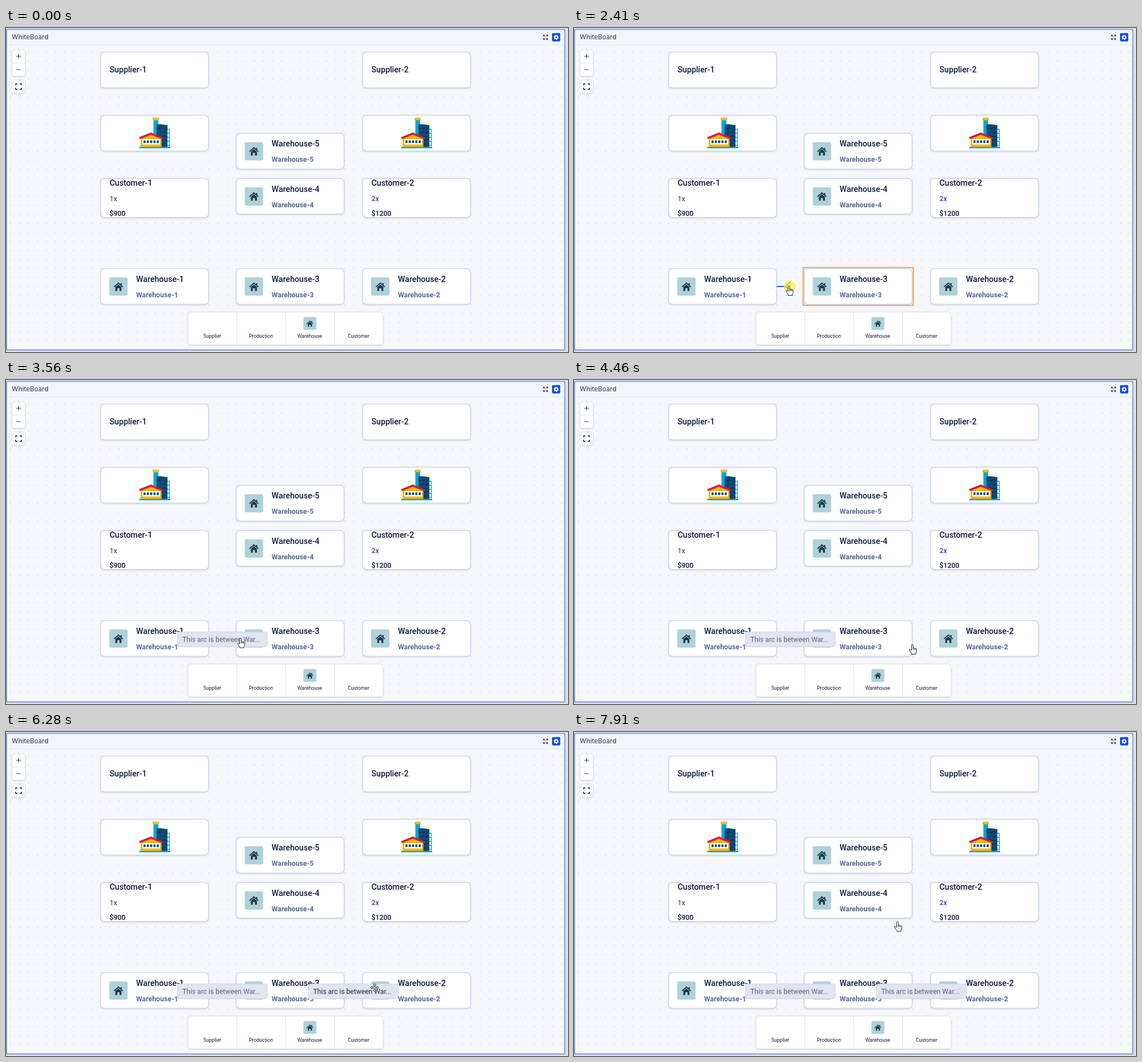
Animation of 985x569 px, one loop 8000 ms. Source, as an HTML page:

```html
<!DOCTYPE html>
<html lang="en">
<head>
<meta charset="utf-8">
<title>WhiteBoard</title>
<style>
html, body { margin: 0; width: 100%; height: 100%; overflow: hidden; background: #dfe0e6; }
svg { display: block; }
text { font-family: Roboto, Arial, sans-serif; font-weight: 500; fill: #0b1a3c; }
.title { font-size: 14.2px; }
.sub { font-size: 12.3px; fill: #566a98; font-weight: 600; }
.money { font-size: 12.3px; }
.tool { font-size: 8.7px; text-anchor: middle; font-weight: 400; }
.head { font: 500 11.5px Inter, Roboto, sans-serif; fill: #4d5366; }
.tip { font-size: 12.1px; font-weight: 400; }
.card { fill: #fff; stroke: #cdd6e9; stroke-width: 1.4; }
.hot { fill: none; stroke: #f6a64c; stroke-width: 2; }
.link { fill: none; stroke: #2f62c4; stroke-width: 1.8; }
</style>
</head>
<body>
<svg width="985" height="569" viewBox="0 0 985 569">
  <defs>
    <pattern id="dots" x="-.3" y="2.4" width="15.84" height="15.84" patternUnits="userSpaceOnUse">
      <circle cx="7.9" cy="7.9" r=".85" fill="#cdd3df"/>
    </pattern>
    <filter id="soft" x="-10%" y="-20%" width="120%" height="150%">
      <feDropShadow dx="0" dy="1" stdDeviation="1" flood-color="#8fa0c4" flood-opacity=".4"/>
    </filter>
    <g id="house">
      <rect x="-16" y="-16" width="32" height="32" rx="2.5" fill="#aed1da"/>
      <path d="M-7.6 .6L0-6.2L7.6 .6" fill="none" stroke="#1d394c" stroke-width="1.9"/>
      <path d="M3.6-6h2.2v4l-2.2-2zM-5.3 1L0-3.7L5.3 1V7.6H1.9V2.8H-1.9V7.6H-5.3z" fill="#1d394c"/>
    </g>
    <g id="factory">
      <path d="M258.5 161h8.5v40h-8.5z" fill="#08a5d3"/>
      <path d="M264 169h7l12 1.5v40h-19z" fill="#0f4a75"/>
      <path d="M264 176h19M264 183h19M264 190h19M270 197h13M272 204h11" stroke="#0a2f50" stroke-width="1.2"/>
      <path d="M283 178h3.6v33M283 185h3.6M283 192h3.6M283 199h3.6M283 206h3.6" fill="none" stroke="#08a5d3" stroke-width="1.3"/>
      <rect x="257" y="157.6" width="11.3" height="4.6" rx="1" fill="#fdb50b"/>
      <path d="M236 193L254 186L272.5 193V209H236z" fill="#fdb50b"/>
      <rect x="239" y="195" width="31" height="9.5" rx="1" fill="#fff"/>
      <path d="M241 199.7h27.5" stroke="#0f4a75" stroke-width="4.6" stroke-dasharray="3.7 2.1"/>
      <path d="M234 193.5L254 185.5L274.3 193.5" fill="none" stroke="#d01c53" stroke-width="3.6"/>
      <path d="M233.5 210h54.5" stroke="#08a5d3" stroke-width="2.6"/>
    </g>
  </defs>
  <rect x="1" y="2.7" width="978.3" height="562.8" rx="1" fill="#f6f7fb" stroke="#5b83d6" stroke-width="1.5"/>
  <path d="M2 3.5h976.5v26.5h-976.5z" fill="#f4f5f9"/>
  <path d="M2 30h976.5" stroke="#e8eaf0"/>
  <rect x="2" y="34" width="976" height="530" fill="url(#dots)"/>
  <text class="head" x="10" y="20.2">WhiteBoard</text>
  <g fill="none" stroke="#3b4254" stroke-width="1.1">
    <path d="M942 15V12.4h2.6M946.8 12.4h2.7V15M949.5 17.4v2.7h-2.7M944.6 20.1H942v-2.7M942 12.4l2.8 2.8M949.5 12.4l-2.8 2.8M942 20.1l2.8-2.8M949.5 20.1l-2.8-2.8"/>
  </g>
  <rect x="957" y="9" width="14.4" height="14.4" rx="2" fill="#0b4df5"/>
  <circle cx="964.2" cy="16.2" r="2.6" fill="none" stroke="#fff" stroke-width="2"/>
  <circle cx="964.2" cy="16.2" r="3.8" fill="none" stroke="#fff" stroke-width="1.3" stroke-dasharray="2 1.98"/>
  <g filter="url(#soft)">
    <rect x="10.5" y="38.3" width="23" height="46.2" rx="4" fill="#fff" stroke="#dfe3ec"/>
    <rect x="10.5" y="91.3" width="23" height="23" rx="4" fill="#fff" stroke="#dfe3ec"/>
  </g>
  <path d="M11 61.4h22" stroke="#dfe3ec"/>
  <path d="M18 49.5h8M22 45.5v8M18 73h8" stroke="#30384a" stroke-width="1.2"/>
  <path d="M17 100.6V98h3M24 98h3v2.6M27 105v2.8h-3M20 107.8h-3V105" fill="none" stroke="#20283a" stroke-width="1.6"/>

  <g id="cards"></g>
  <g id="over"></g>

  <rect x="319" y="498.6" width="342" height="57.6" rx="4" fill="#fff" stroke="#d5dcea" filter="url(#soft)"/>
  <path d="M404.5 499v57M490 499v57M575.5 499v57" stroke="#d9dfeb"/>
  <use href="#house" transform="translate(532.6 519) scale(.71)"/>
  <text class="tool" x="361.5" y="544.2">Supplier</text>
  <text class="tool" x="447" y="544.2">Production</text>
  <text class="tool" x="532.5" y="544.2">Warehouse</text>
  <text class="tool" x="618" y="544.2">Customer</text>

  <g id="mouse">
    <circle id="press" cx=".5" cy="1.5" r="10.3" fill="#fbf03c" opacity=".72"/>
    <path id="arrow" d="M0 0V11.6L2.7 9.2L4.6 13.4L6.6 12.5L4.7 8.4H8.4z" fill="#fff" stroke="#222" stroke-width=".9"/>
    <path id="hand" d="M-2.5 10V1.5a1.4 1.4 0 0 1 2.8 0V6.2q1.2-.9 2 .3q1.3-.7 2 .5q1.8-.4 2 1.3V12q0 1.7-1.3 3.2V17H-2.2V15.6Q-4.2 13.4-6.2 9.8q-.2-1.6 1.5-1.1zM.3 6.2V9.4M2.3 6.7V9.4M4.3 7.2V9.6" fill="#fff" stroke="#222" stroke-width="1" stroke-linejoin="round"/>
    <path id="move" d="M0-7.5L2.4-4.6H.9V-.9H4.6V-2.4L7.5 0L4.6 2.4V.9H.9V4.6H2.4L0 7.5L-2.4 4.6H-.9V.9H-4.6V2.4L-7.5 0L-4.6-2.4V-.9H-.9V-4.6H-2.4z" fill="#fff" stroke="#222" stroke-width=".9"/>
  </g>
</svg>
<script>
const $ = id => document.getElementById(id);
const text = (cls, x, y, s) => `<text class="${cls}" x="${x}" y="${y}">${s}</text>`;
const box = (x, y, h = 62.6) =>
  `<rect class="card" x="${x}" y="${y}" width="189" height="${h}" rx="6.5" filter="url(#soft)"/>`;

const supplier = (x, n) => box(x, 42.4) + text('title', x + 15.5, 78.4, 'Supplier-' + n);
const plant = x => box(x, 153.3) + `<use href="#factory" x="${x - 166}"/>`;
const customer = (x, n, price) => box(x, 264.2, 68.5) +
  text('title', x + 15.5, 277.2, 'Customer-' + n) +
  text('sub', x + 15.5, 304.4, n + 'x') +
  text('money', x + 15.5, 329.6, '$' + price);
const warehouse = (x, y, n) => box(x, y) +
  `<use href="#house" transform="translate(${x + 31} ${y + 31.5})"/>` +
  text('title', x + 62, y + 23.4, 'Warehouse-' + n) +
  text('sub', x + 62, y + 50.4, 'Warehouse-' + n);

$('cards').innerHTML =
  supplier(166, 1) + supplier(625, 2) + plant(166) + plant(625) +
  customer(166, 1, 900) + customer(625, 2, 1200) +
  warehouse(403.5, 185, 5) + warehouse(403.5, 264.2, 4) +
  warehouse(166, 422.6, 1) + warehouse(403.5, 422.6, 3) + warehouse(625, 422.6, 2);

const hot = (id, x) =>
  `<rect id="${id}" class="hot" x="${x}" y="420.6" width="193" height="66.6"/>`;
const tip = (id, x) => `<g id="${id}">
  <rect x="${x}" y="442.4" width="157.6" height="26" rx="4" fill="#e0e6f1" stroke="#c9d2e4"/>
  ${text('tip', x + 8.6, 460, 'This arc is between War...')}</g>`;

$('over').innerHTML =
  '<circle id="halo" cx="355" cy="454" r="9" fill="none" stroke="#dde4f0" opacity=".7"/>' +
  '<path id="link1" class="link"/><path id="link2" class="link"/>' +
  hot('hot1', 164) + hot('hot3', 401.6) + hot('hot2', 623) +
  tip('tip1', 300.4) + tip('tip2', 529.8);

// time, x, y of the pointer's tip
const path = [
  [310, 652, 551], [500, 590, 518], [700, 480, 470], [880, 395, 449], [1060, 357, 445],
  [1130, 354, 440], [1260, 354, 450], [1530, 354, 451], [1600, 355, 452],
  [1930, 355, 452], [2130, 362, 453], [2410, 377.5, 452.5], [2690, 390, 453], [3030, 410, 453],
  [3560, 410, 453], [3800, 480, 462], [4000, 565, 474], [4120, 594, 477], [4300, 594, 470], [4600, 594, 459],
  [4930, 594, 459], [5130, 602, 456], [5340, 613, 454.5], [5540, 628, 450], [5680, 637, 447], [5820, 640, 447],
  [6150, 640, 447], [6280, 646, 449], [6500, 662, 444], [6900, 687, 430], [7240, 688, 424],
  [7440, 688, 424], [7600, 640, 385], [7780, 585, 345], [7910, 568, 333]
];
// time, pointer shape
const shapes = [[0, ''], [310, 'arrow'], [1100, 'hand'], [3700, 'arrow'], [4050, 'hand'],
  [5100, 'arrow'], [5650, 'move'], [6500, 'hand']];

const STEP = 7600 / 112;

function pointAt(t) {
  const i = path.findIndex(p => p[0] >= t);
  if (i < 0) return path[path.length - 1].slice(1);
  if (i === 0) return path[0].slice(1);
  const [a, x, y] = path[i - 1], [b, u, v] = path[i], k = (t - a) / (b - a);
  return [x + (u - x) * k, y + (v - y) * k];
}
const show = (id, on) => $(id).style.display = on ? '' : 'none';

function draw(now) {
  const real = now % 8000;
  const t = 310 + Math.floor((real - 302) / STEP) * STEP;
  const within = (a, b) => t >= a - 12 && t < b - 12;
  const [x, y] = pointAt(t);
  const shape = shapes.filter(s => t >= s[0] - 12).pop()?.[1] || '';
  const drag1 = within(1930, 3360), drag2 = within(4930, 6150);

  ['arrow', 'hand', 'move'].forEach(s => show(s, s === shape));
  show('press', drag1 || drag2);
  $('mouse').setAttribute('transform', `translate(${x.toFixed(2)} ${y.toFixed(2)})`);

  show('hot1', within(1930, 2140));
  show('hot3', within(2270, 3430) || within(4930, 5100));
  show('hot2', within(5550, 6150));
  show('halo', drag1);
  show('tip1', within(3360, 9000));
  show('tip2', within(6150, 9000));
  $('tip1').lastElementChild.style.fill = within(3360, 3490) ? '#1d2a45' : '#5b6475';
  $('tip2').lastElementChild.style.fill = within(6150, 6420) ? '#1d2a45' : '#5b6475';

  show('link1', drag1);
  const e = Math.min(x - 7, 403);
  $('link1').setAttribute('d', `M355 454H${Math.max(e, 356)}` +
    (e > 357 ? `M${e + 9} 445.5L${e} 454L${e + 9} 462.5` : ''));

  show('link2', within(5070, 9000));
  const s = x - 5;
  $('link2').setAttribute('d', within(5070, 5550)
    ? `M498 486V492Q498 501 507 501H${s - 8}Q${s} 501 ${s} 490V455M${s - 8.5} 462.5L${s} 454L${s + 8.5} 462.5`
    : 'M593 454H625');
}
const start = performance.now();
function tick() {
  draw(performance.now() - start);
  requestAnimationFrame(tick);
}
tick();
</script>
</body>
</html>
```
